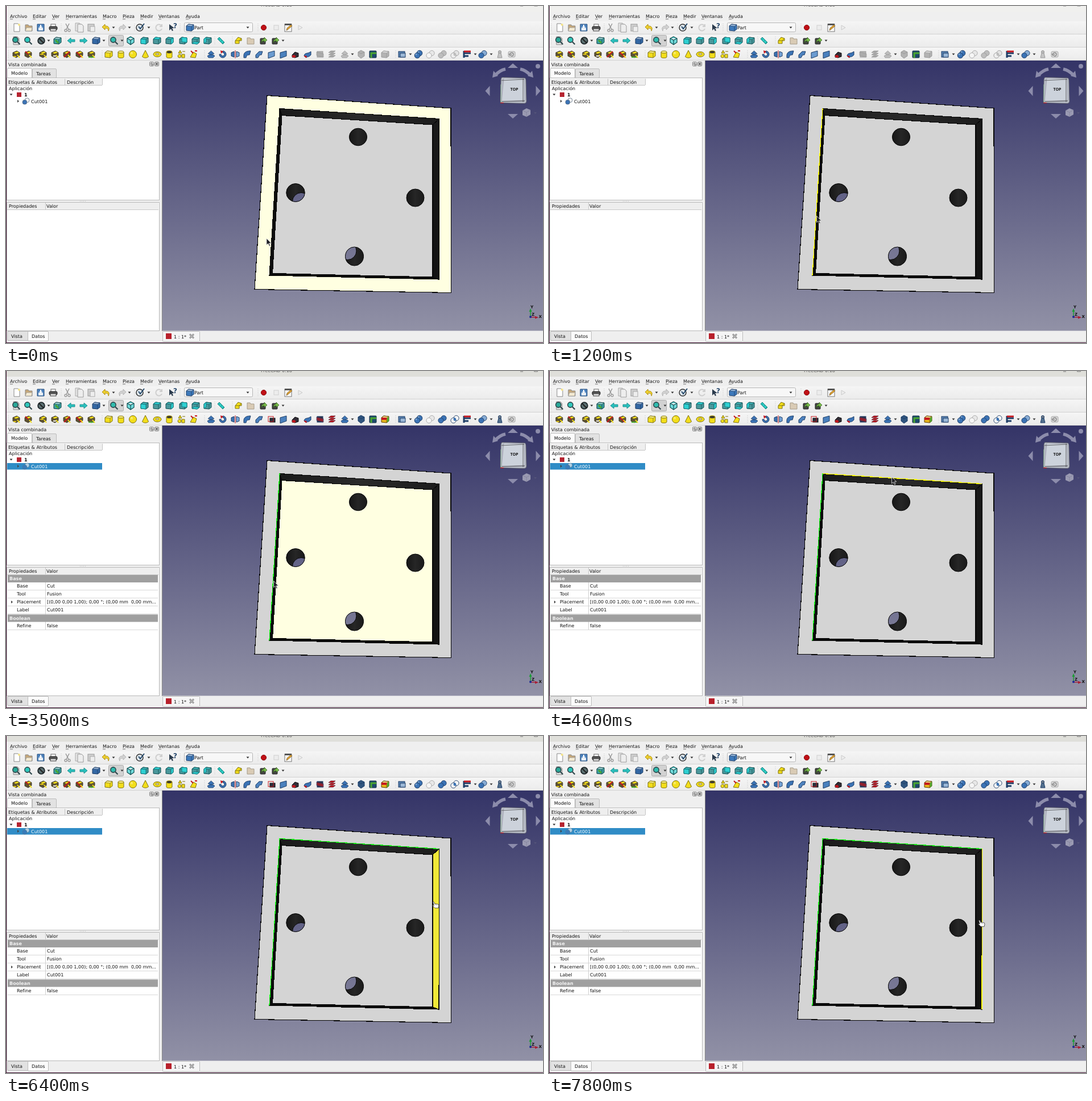
These frames come from a looping animation (944 by 593 pixels, 8000 ms). An HTML page:

```html
<!DOCTYPE html>
<html lang="es">
<head>
<meta charset="utf-8">
<title>Part</title>
<style>
html, body { margin: 0; width: 100%; height: 100%; overflow: hidden; background: #efefef; }
svg { display: block; width: 944px; height: 593px; }
text { font-family: "DejaVu Sans", sans-serif; font-size: 8.07px; fill: #111; white-space: pre; text-rendering: geometricPrecision; }
.b { font-weight: bold; }
</style>
</head>
<body>
<svg id="stage" viewBox="0 0 944 593" xmlns="http://www.w3.org/2000/svg"></svg>
<script>
const rect = (x, y, w, h, fill, stroke = 'none', rx = 0, more = '') =>
  `<rect x="${x}" y="${y}" width="${w}" height="${h}" rx="${rx}" fill="${fill}" stroke="${stroke}" ${more}/>`;
const path = (d, fill, stroke = 'none', w = 1, more = '') =>
  `<path d="${d}" fill="${fill || 'none'}" stroke="${stroke}" stroke-width="${w}" ${more}/>`;
const disc = (x, y, r, fill, stroke = 'none', w = 1) =>
  `<circle cx="${x}" cy="${y}" r="${r}" fill="${fill}" stroke="${stroke}" stroke-width="${w}"/>`;
const text = (x, y, s, more = '') => `<text x="${x}" y="${y}" ${more}>${s}</text>`;
const at = (x, y, art) => `<g transform="translate(${x} ${y})">${art}</g>`;
const poly = pts => 'M' + pts.map(p => p.join(' ')).join('L') + 'z';
const line = (a, b) => `M${a.join(' ')}L${b.join(' ')}`;

const BLUE = '#3b73b5', NAVY = '#1d3d66', TEAL = '#2fd0d2', YELLOW = '#f3de1b',
  OLIVE = '#7d7010', GREY = '#b3b3b3', DIM = '#9a9a9a', RED = '#c5161d',
  GREEN = '#4aa62e', CREAM = '#ffffe1', PLATE = '#d4d4d4',
  LIT = '#f0e838', PICK = '#14f014', HOVER = '#ffff00';

// Toolbar artwork, centred on 0,0
const caret = path('M-2.5 -1.5h5l-2.5 3z', '#333');
const cube = (f, s, lite = '#fff') =>
  path('M-6 -3l4-3 9 1v8l-4 3-9-1z', f, s) +
  path('M-6 -3l4-3 9 1-4 3z', lite, s, .7, 'fill-opacity=".45"') + path('M3 -2v8', '', s, .8);
const ball = (f, s, r = 6) => disc(0, 0, r, f, s) + disc(-2, -2, r / 3, '#fff').replace('/>', ' fill-opacity=".35"/>');
const page = (f = '#fff', s = '#888') => path('M-5 -7h7l3 3v11h-10z', f, s);
const folder = c => path('M-6 6v-11h5l1 2h6v9z', c, '#888') + path('M-6 6l2-6h10l-1 6z', '#f4ead2', '#999', .8);
const lens = (f, rim = '#2d474c') => disc(-1.5, -1.5, 4.6, f, rim, 1.6) + path('M2 2l4.5 4.5', '', rim, 2.2);
const arrow = (c, dir) => `<g transform="scale(${dir} 1)">` + path('M-7 0l6-5v3h7v4h-7v3z', c, '#128385', .8) + '</g>';
const turn = (c, s, dir) => `<g transform="scale(${dir} 1)">` +
  path('M-7 -1l5-5v3c6 0 9 3 6 9c0-4-2-5-6-5v3z', c, s, .9) + '</g>';
const magnet = (c, d) => path('M-6 3v-6l7-3 5 3v5l-6 4z', '#5d5232', '#332c1a', .8) +
  path('M-4 -3l6-2 3 2-6 2z', YELLOW) + path(d, '', c, 2) + path('M2 1l4 5', '', YELLOW, 2);
const view = d => cube('#4a989c', '#134e52', TEAL) + path(d, TEAL, '#0b7478', .8);
const sheet = (f, s) => path('M-6 -3l11-3v9l-11 4z', f, s);
const layers = (a, s) => [-4, 0, 4].map(y => path(`M-6 ${y + 1}l4-3h8l-4 3z`, a, s, .7)).join('');
const lift = (f, s) => path('M-5 -1h3l0 2h5v-2h3l-5.500-5z', f, s, .8) + path('M-6 3l3-2h8l2 2-3 3h-8z', f, s, .8);
const pair = (a, b, s) => disc(2.5, -2, 4.6, a, s, .9) + disc(-2.5, 2, 4.6, b, s, .9);
const save = path('M-6 -6h12v12h-12z', '#4c82bd', '#29517e') + rect(-4, 0, 8, 5, '#e8eef4') +
  path('M-1 -5h2v3h2l-3 3-3-3h2z', '#fff');
const share = rect(-5, -4, 9, 10, '#444', '#222', 1) +
  path('M-3 4c0-6 3-7 5-7v-3l5 5-5 4v-3c-3 0-4 1-5 4z', '#7bc04c', '#2a5316', .7);

const put = (y, list) => list.map(([x, art]) => at(x, y, art)).join('');
const carets = (y, xs) => xs.map(x => at(x, y, caret)).join('');
const grips = (y, xs) => xs.map(x => path(`M${x} ${y - 7}v14`, '', '#c3c3c3', 1, 'stroke-dasharray="1 2"')).join('');

function toolbars() {
  const bars = [27, 50, 73].map(y => rect(1, y, 943, 23, 'url(#bar)') + path(`M1 ${y + 22.5}h943`, '', '#d2d2d2')).join('');

  const top = put(38, [
    [19, page() + disc(4, -5, 2, '#f6e58b')], [40, folder('#c8a878')], [61, save],
    [83, rect(-4, -6, 8, 5, '#fff', '#666') + rect(-7, -2, 14, 6, '#555', '#222', 2) + rect(-5, 2, 10, 4, '#ddd', '#444')],
    [108, path('M-3 -7l5 10M3 -7l-5 10', '', DIM, 1.5) + disc(-3, 5, 2, 'none', DIM, 1.4) + disc(3, 5, 2, 'none', DIM, 1.4)],
    [129, at(-2, -1, page('#e4e4e4', '#aaa')) + at(2, 1, page('#eee', '#999'))],
    [150, rect(-6, -6, 11, 12, '#cfcfcf', '#999') + rect(-2, -2, 8, 9, '#eee', '#aaa')],
    [176, turn('#edcf30', '#a88708', 1)], [204, turn('#d2d2d2', '#b0b0b0', -1)],
    [236, disc(-1, 0, 6, '#dfe7ec', '#333', 1.5) + path('M-3 -2l3 4 7-9', '', '#25496b', 2)],
    [269, path('M5 -2a5.500 5.500 0 1 0 0 4M5 -6v4h-4', '', '#cfcfcf', 2)],
    [293, path('M-6 -6v11l3-3 2 4 2-1-2-4h4z', '#2a3a4c') + text(1, 1, '?', 'class="b" style="font-size:12px;fill:#27486d"')]
  ]) + carets(38, [189, 217, 251]) +
    rect(313.5, 29.5, 120, 16, '#f7f7f7', '#b5b5b5', 2) + at(323, 38, cube('#3d79bb', NAVY)) +
    text(331, 41, 'Part') + at(425, 38, caret) +
    put(38, [
      [453, disc(0, 0, 4.6, '#c01016', '#8b0c10')], [475, rect(-4, -4, 8, 8, '#ededed', '#cfcfcf')],
      [496, rect(-6, -6, 12, 13, '#fafafa', '#777') + rect(-6, -7, 12, 3, '#555') + path('M-3 5l1-4 7-6 2 2-7 6z', '#e1a334', '#6d511d', .7)],
      [517, path('M-3 -4l7 4-7 4z', '#ededed', '#cacaca')]
    ]);

  const mid = rect(180.5, 51.5, 26, 19, '#d2d2d2', '#aaa', 2) + put(61, [
    [18, page('#ddd') + lens('#2aa898')], [39, lens('#30c8bc')],
    [62, disc(0, 0, 5.8, '#5e7375', '#20292c', 2) + path('M-4 -4l8 8', '', '#222', 2)],
    [90, cube('#3aa2a4', '#123f42') + path('M-3 -1l5 5', '', GREEN, 3)],
    [115, arrow('#2bc0bd', 1)], [136, arrow('#2bc0bd', -1)],
    [158, cube('#3468a4', NAVY)], [190, lens('#2fbcae')],
    [219, path('M0 -7l6 3v7l-6 4-6-4v-7zM-6 -4l6 3 6-3M0 -1v8', '#71dcdc', '#0d4a4e', 1.2)],
    [243, view('M-6 -3l9 1v8l-9-1z')], [265, view('M-6 -3l4-3 9 1-4 3z')],
    [287, view('M3 -2l4-3v8l-4 3z')], [311, view('M-2 -6l9 1v8l-9-1z')],
    [333, view('M-6 5l4-3 9 1-4 3z')], [354, view('M-6 -3l4-3v8l-4 3z')],
    [378, path('M-6 -3l3-3 9 9-3 3z', '#31cfc9', '#0b7776') + path('M-2 -3l-1 1M1 0l-1 1M4 3l-1 1', '', '#064', 1)],
    [408, path('M-5 0l5-6 6 2v4h-4v5h-7z', YELLOW, OLIVE) + path('M-5 0h7l4-4', '', OLIVE)],
    [430, path('M-6 6v-11h5l1 2h6v9z', '#d9cbb5', '#a49a88')], [452, share], [473, share]
  ]) + carets(61, [75, 172, 204, 487]);

  const low = put(85, [
    [18, magnet('#d9c01a', 'M-5 4h5')], [39, magnet(RED, 'M-5 -5l5 5')], [65, magnet('#d9c01a', 'M-5 0h6')],
    [86, magnet('#eee', 'M-3 3h5')], [107, magnet(RED, 'M-5 5l10-10')], [129, magnet(RED, 'M-5 -4l9 9')],
    [150, magnet(GREEN, 'M-5 5h10')],
    [180, cube(YELLOW, OLIVE)],
    [202, path('M-5 -4v9c1 2 9 2 10 0v-9', YELLOW, OLIVE) + '<ellipse cy="-4" rx="5" ry="2" fill="#fff283" stroke="#7d7010"/>'],
    [223, ball(YELLOW, OLIVE, 6.5)], [245, path('M0 -7l5.500 11c-2 3-9 3-11 0z', YELLOW, OLIVE)],
    [266, '<ellipse rx="7" ry="4.500" fill="#f3de1b" stroke="#7d7010"/><ellipse cy="-.5" rx="3" ry="1.500" fill="#eee" stroke="#7d7010"/>'],
    [287, path('M-5 -4v9c1 2 9 2 10 0v-9', YELLOW, OLIVE) + '<ellipse cy="-4" rx="5" ry="2.300" fill="#333" stroke="#c3ac10"/>'],
    [308, at(-3, 3, ball(YELLOW, OLIVE, 3)) + path('M-5 -2l3-5 3 5z', YELLOW, OLIVE) + path('M1 0h5v6h-5zM2 -5h5', YELLOW, OLIVE)],
    [330, path('M-6 5l5-9 6 3-2 7z', YELLOW, OLIVE) + path('M-5 -6l4 4M2 -6h4', '', RED, 2)],
    [360, lift(BLUE, NAVY)],
    [381, path('M-6 0a6 6 0 1 0 6-6v3a3 3 0 1 1-3 3z', BLUE, NAVY) + path('M-4 -7l5 2-4 4z', RED)],
    [403, path('M-2 -5l-5 2v6l5 2z', BLUE, NAVY) + path('M2 -5l5 2v6l-5 2z', '#78a8dd', NAVY) + path('M0 -7v14', '', RED)],
    [424, path('M-6 6v-5c1-5 5-7 12-7l-2 7c-4 0-5 1-6 5z', BLUE, NAVY)],
    [445, path('M-6 6v-5l6-6h6l-2 6h-3l-3 5z', '#4e83bf', NAVY)],
    [488, sheet('#4a80bd', NAVY)],
    [509, path('M-6 1l5-5 6 2v6l-6 2-5-1z', '#312d36', '#111') + path('M-6 2l4-1 3 3-3 2-4-1z', RED)],
    [530, path('M-6 3c1-7 6-3 12-8v6c-4 5-6 2-8 5z', BLUE, NAVY) + path('M-6 3l4 3v-3z', RED, RED)],
    [645, rect(-6, -6, 12, 12, '#1d4a6b', '#122f45', 1) + path('M-3 6v-8h9', '', GREEN, 3)],
    [696, rect(-6, -5, 11, 10, '#5d86b4', NAVY) + rect(-3, -2, 9, 7, '#9cb9d8', NAVY)],
    [725, at(2, -2, ball(BLUE, NAVY, 4.8)) + at(-2, 2, ball(BLUE, NAVY, 4.8))],
    [746, pair('#e8e8e8', '#f6f6f6', '#a5a5a5')],
    [811, path('M-6 -6v12M-6 -2h12M-6 3h8', '', NAVY, 3) + path('M-6 -5h12', '', RED, 3)],
    [838, pair('#87acd5', BLUE, NAVY)],
    [889, rect(-6, -5, 12, 10, '#d8d8d8', '#aaa', 2) + path('M-3 0a3 3 0 1 1 2 3M-5 -1l2 3 3-2', '', '#888', 1.4)]
  ]) + carets(85, [609, 711, 825, 853]);

  const tools = on => {
    const f = on ? BLUE : '#bdbdbd', s = on ? NAVY : '#999', r = on ? RED : '#a8a8a8';
    return put(85, [
      [467, on ? rect(-3, -2, 9, 7, '#26303e', '#111') + rect(-6, -5, 9, 9, 'none', RED) : sheet('#6b9bd0', NAVY)],
      [552, rect(-5, -5, 10, 10, on ? '#2f3349' : GREY, s) + path('M-6 -4l12 3v6l-12-3z', r, s, .7, 'fill-opacity=".65"')],
      [573, layers(r, on ? '#4d0f22' : '#8c8c8c')], [595, lift(f, s)],
      [624, path('M-5 -4l5-3 6 3v7l-6 4-5-4z', on ? '#30557f' : GREY, s) + path('M-5 -4l5 3 6-3', '', s)],
      [666, cube(on ? '#e6b51d' : GREY, on ? '#604000' : '#999') + (on ? path('M-6 -3h9v4h-9z', RED) + path('M4 -2l3-3v8l-3 3z', GREEN) : '')],
      [767, pair(f, f, s)],
      [789, pair(on ? '#f5f5f5' : '#e4e4e4', on ? '#f5f5f5' : '#eee', s) + path('M-1 -3c4 0 4 5 1 6c-3-1-3-4-1-6z', f)],
      [868, disc(0, -4, 2.6, on ? '#77828f' : '#bbb', s) + path('M-4 6l2-8h4l2 8z', on ? '#53708e' : '#c5c5c5', s)]
    ]);
  };
  return bars + grips(38, [4, 97, 226, 306, 443]) + grips(61, [4, 105, 367, 398]) + grips(85, [4, 169, 349, 685]) +
    top + mid + low + `<g id="off">${tools(false)}</g><g id="on">${tools(true)}</g>`;
}

function menus() {
  const items = [[7, 'Archivo'], [47, 'Editar'], [81, 'Ver'], [105, 'Herramientas'], [170, 'Macro'],
    [205, 'Pieza'], [236, 'Medir'], [268, 'Ventanas'], [316, 'Ayuda']];
  return rect(0, 0, 944, 10, '#f0f0ee', 'none', 0, 'id="strip"') +
    `<g id="title">${text(448, .8, 'FreeCAD 0.18', 'style="fill:#555"') + path('M904 0h5M928.500 -3v3h6v-3', '', '#777')}</g>` +
    items.map(([x, s]) => text(x, 21.2, s) + path(`M${x} 23h5`, '', '#333', .7)).join('');
}

const tab = (x, y, w, h, s, on) => rect(x + .5, y + .5, w, h, on ? '#fbfbfb' : '#e2e2e2', '#bcbcbc', 1.5) + text(x + 7, y + h / 2 + 3.5, s);

function panels() {
  const row = (y, k, v) => text(19, y + 3, k) + text(72, y + 3, v) + path(`M3 ${y + 7.5}h264`, '', '#d8d8d8');
  const group = (y, s) => rect(3, y - 6, 264, 13, '#9f9f9f') + text(6, y + 3, s, 'class="b" style="fill:#f2f2f2"');
  return text(4, 105.5, 'Vista combinada') +
    [252.5, 261.5].map(x => rect(x, 98.5, 7, 7, '#eee', '#777', 1)).join('') +
    path('M254.500 103.500v-3h3M256 102h2v2h-2z', '', '#555', .8) + path('M263 100l4 4m0-4l-4 4', '', '#444', 1.1) +
    tab(2, 109, 43, 17, 'Modelo', true) + tab(46, 110, 42, 16, 'Tareas') +
    rect(1.5, 126.5, 268, 215, '#fff', '#b9b9b9') +
    rect(2, 128, 167, 11, '#eeeeee') + path('M2 139.500h167M103.500 128v11M169.500 128v11', '', '#c4c4c4') +
    text(4, 136.5, 'Etiquetas &amp; Atributos') + text(107, 136.5, 'Descripción') +
    text(5, 148, 'Aplicación') + at(9, 156, caret) + rect(19, 152, 8, 8, '#b52430') + text(32, 159, '1', 'class="b"') +
    `<g id="row">${rect(2, 162, 167, 11.5, '#308cc6')}</g>` +
    path('M20 165l3 2.500-3 2.500z', '#444') +
    at(35, 167.5, `<g id="cut" transform="scale(.85)">${pair('#f5f5f5', BLUE, '#5a6c80')}</g>`) +
    text(44, 170.5, 'Cut001', 'id="name"') +
    rect(1.5, 345.5, 268, 226, '#fff', '#b9b9b9') + rect(2, 346, 266, 12, '#eee') +
    path('M2 358.500h266M69.500 346v12', '', '#c8c8c8') + path('M130 343.500h12', '', '#bbb', 1, 'stroke-dasharray="1 2"') +
    text(5, 355, 'Propiedades') + text(71, 355, 'Valor') +
    `<g id="props">` + row(378, 'Base', 'Cut') + row(392, 'Tool', 'Fusion') +
    row(406, 'Placement', '[(0,00 0,00 1,00); 0,00 °; (0,00 mm  0,00 mm...') + row(420, 'Label', 'Cut001') +
    row(448, 'Refine', 'false') + path('M69.500 358v97', '', '#d0d0d0') + group(365, 'Base') + group(434.5, 'Boolean') +
    path('M9 404l3 2.500-3 2.500z', '#444') + '</g>' +
    tab(2, 572, 37, 16, 'Vista') + tab(38, 572, 36, 17, 'Datos', true) +
    rect(275.5, 572.5, 65, 18, '#f5f5f5', '#bcbcbc', 1) + path('M341 590.500h603', '', '#c4c4c4') +
    rect(281, 576, 10, 10, '#b8202b') + text(295, 584.5, '1 : 1*') +
    path('M323 577.500l7 7m0-7l-7 7', '', '#777', 2.6) + path('M323 577.500l7 7m0-7l-7 7', '', '#eee', 1);
}

// Plate corners, clockwise from top left
const outer = [[459, 157.5], [782, 180], [782.5, 504.5], [437, 498.5]];
const inner = [[481, 180.5], [761.5, 198.5], [761, 481], [463, 474]];
const base = [[485, 192.5], [750, 209], [750, 477], [468.5, 470.5]];
const wall = i => poly([inner[i], inner[(i + 1) % 4], base[(i + 1) % 4], base[i]]);

function hole(id, x, y, rx, ry, bx, by, br) {
  const shape = `cx="${x}" cy="${y}" rx="${rx}" ry="${ry}"`;
  const back = br ? `<clipPath id="${id}"><ellipse ${shape}/></clipPath><g clip-path="url(#${id})">${disc(bx, by, br, 'url(#sky)', '#050505')}</g>` : '';
  return `<ellipse ${shape} fill="url(#bore)"/>${back}<ellipse ${shape} fill="none" stroke="#050505"/>`;
}

function plate() {
  const edge = '#060606';
  return '<g shape-rendering="crispEdges">' +
    path(poly(outer), PLATE, edge, 1.2, 'id="rim"') +
    path(poly(inner), '#080808') +
    path(wall(0), 'url(#dimT)', edge, 1, 'id="wallT"') + path(wall(1), 'url(#dimR)', edge, 1, 'id="wallR"') +
    path(wall(2), '#0a0a0a', edge) + path(wall(3), '#0c0c0c', edge) +
    path(poly(base), PLATE, edge, 1.1, 'id="floor"') +
    path(poly(inner), '', edge, 1.1) +
    ['L', 'T', 'R'].map((k, i) => path(line(inner[(i + 3) % 4], inner[i]), '', 'none', 1.3, `id="edge${k}"`)).join('') + '</g>' +
    hole('h1', 619, 230.5, 15.6, 15.3) + hole('h2', 509, 328.5, 16.3, 16, 519, 344, 15.5) +
    hole('h3', 719.5, 337.5, 15.5, 15.5) + hole('h4', 612.5, 440.5, 16, 16.5, 600.5, 431, 15.5);
}

function compass() {
  const pad = '#8c8cab';
  return path('M891 101l9 8h-18zM891 198l9-8h-18zM842.500 149.500l8-9v18zM939.500 149.500l-8-9v18z', pad) +
    path('M860 122q8-9 18-11', '', pad, 5.5) + path('M855 126l2-12 8 9z', pad) +
    path('M904 111q10 2 18 11', '', pad, 5.5) + path('M927 126l-2-12-8 9z', pad) + disc(935, 106, 4, pad) +
    path('M873 125.500l39 1q2 1 2 4l1 37q0 4-4 4l-38-1q-4 0-4-4l1-37q0-4 3-4z', '#b7bcc6', '#50505e', .8) +
    path('M875 127l36 1 1 38-41 2z', '#ccd2db', '#9a9aa8', .8) +
    path('M871 131l40-2M872 168l40-1M909 128v41', '', '#333', .7) +
    path('M870 170v-32', '', '#9bc4a1', 1) + path('M869 170.500h6', '', '#c22', 1.2) +
    text(886.5, 149, 'TOP', 'class="b" style="font:bold 7px \'Open Sans\',sans-serif"') +
    path('M908 184l7-4 7 3v8l-7 4-7-3z', '#9a9ab2') + path('M908 184l7 3 7-4M915 187v8', '', '#80809a', .8) +
    path('M928 187h5l-2.500 3z', '#55557a') +
    path('M922 547v-12', '', '#1d9d35', 1.5) + path('M922 532l2.500 6h-5z', '#1d9d35') +
    path('M922 547.500h10', '', '#a81c33', 1.5) + path('M936 548l-6 2.500v-5z', '#a81c33') + disc(922, 547, 2, '#1b2899') +
    [[922, 532, 'Y'], [936.5, 549, 'X'], [924, 545, 'Z']].map(([x, y, s]) => text(x, y, s, 'class="b" style="font-size:7px"')).join('');
}

const stops = (...c) => c.map((v, i) => `<stop offset="${i / (c.length - 1)}" stop-color="${v}"/>`).join('');
const stage = document.getElementById('stage');
stage.innerHTML = `<defs>
  <linearGradient id="sky" gradientUnits="userSpaceOnUse" x1="0" y1="96" x2="0" y2="571">${stops('#343467', '#9191a6')}</linearGradient>
  <linearGradient id="bar" x2="0" y2="1">${stops('#f5f5f5', '#ebebeb')}</linearGradient>
  <linearGradient id="dimT">${stops('#1a1a1a', '#2a2a2a', '#1c1c1c')}</linearGradient>
  <linearGradient id="dimR" x2="0" y2="1">${stops('#1a1a1a', '#121212')}</linearGradient>
  <linearGradient id="bore">${stops('#161616', '#262626', '#1a1a1a')}</linearGradient></defs>` +
  rect(0, 0, 944, 593, '#efefef') + rect(275, 96, 669, 475.5, 'url(#sky)') + path('M274.500 96v476', '', '#888') +
  plate() + compass() + menus() + toolbars() + panels() +
  path('M.5 0v593M0 592.500h944', '', '#3d1030') +
  `<g id="arrow">${path('M0 0v11.500l2.800-2.500 2 4.500 1.800-.8-2-4.300h3.600z', '#1c1c22', '#e8e8e8', .8)}</g>` +
  `<g id="hand">${path('M0 .8q1.500-1.400 2.400.4l.8 3 1.600-.4 1.600.3 1.600.2 2 .8q1 2-.4 6.200h-6l-4-4q.2-1.700 2.300-.6z', '#fff', '#333', .8) + path('M4.800 4.500v2M6.800 4.700v2', '', '#777', .6)}</g>`;

const $ = id => document.getElementById(id);
const hovers = [[0, 'rim'], [200, 'edgeL'], [600, 'rim'], [1100, 'edgeL'], [2300, ''], [3500, 'floor'],
  [4500, 'wallT'], [4600, 'edgeT'], [4700, 'rim'], [4900, ''], [5200, 'edgeT'], [5500, ''], [5700, 'wallT'],
  [6100, 'floor'], [6400, 'wallR'], [6500, ''], [6600, 'edgeR'], [7000, 'rim'], [7700, 'edgeR']];
const moves = [[0, 458, 409], [200, 467, 397], [400, 467, 397], [800, 461, 385], [900, 461, 385], [1200, 470.5, 369.5],
  [3500, 470.5, 369.5], [3600, 475, 366], [3700, 475, 366], [4600, 602.5, 186.5], [4800, 603, 180], [4900, 603, 183],
  [5100, 603, 183], [5300, 604, 184], [5600, 604, 184], [5900, 604, 184.5], [6400, 750.5, 291.5], [6500, 751.5, 293],
  [6800, 755.5, 316], [6900, 755.5, 316], [7100, 763, 323], [7500, 763, 323], [7800, 755.5, 324], [8000, 755.5, 324]];

function pointer(t) {
  const i = moves.findIndex(m => m[0] > t), a = moves[i - 1], b = moves[i];
  const k = (t - a[0]) / (b[0] - a[0]), e = k * k * (3 - 2 * k);
  return [a[1] + (b[1] - a[1]) * e, a[2] + (b[2] - a[2]) * e];
}

const show = (id, on) => $(id).setAttribute('display', on ? 'inline' : 'none');
const fill = (id, c) => $(id).setAttribute('fill', c);

function draw(time) {
  const t = Math.floor(time % 8000 / 100) * 100;   // screen refreshes ten times a second
  const hot = hovers.filter(h => h[0] <= t).pop()[1];
  const active = t >= 2100, picked = t >= 2300, ctrl = t >= 5200;
  fill('strip', active ? '#dfdfda' : '#f0f0ee');
  $('title').setAttribute('transform', `translate(0 ${active ? 1 : 0})`);
  fill('rim', hot === 'rim' ? CREAM : PLATE);
  fill('floor', hot === 'floor' ? CREAM : PLATE);
  fill('wallT', hot === 'wallT' ? LIT : 'url(#dimT)');
  fill('wallR', hot === 'wallR' ? LIT : 'url(#dimR)');
  const chosen = { edgeL: picked, edgeT: t >= 5500, edgeR: false };
  for (const id in chosen)
    $(id).setAttribute('stroke', chosen[id] ? PICK : hot === id ? HOVER : 'none');
  show('row', picked);
  $('name').style.fill = picked ? '#fff' : '#111';
  $('cut').style.opacity = picked ? .65 : 1;
  show('on', picked);
  show('off', !picked);
  show('props', t >= 2400);
  show('arrow', !ctrl);
  show('hand', ctrl);
  $(ctrl ? 'hand' : 'arrow').setAttribute('transform', `translate(${pointer(t)})`);
}

const start = performance.now();
function tick() {
  draw(performance.now() - start);
  requestAnimationFrame(tick);
}
tick();
</script>
</body>
</html>
```
